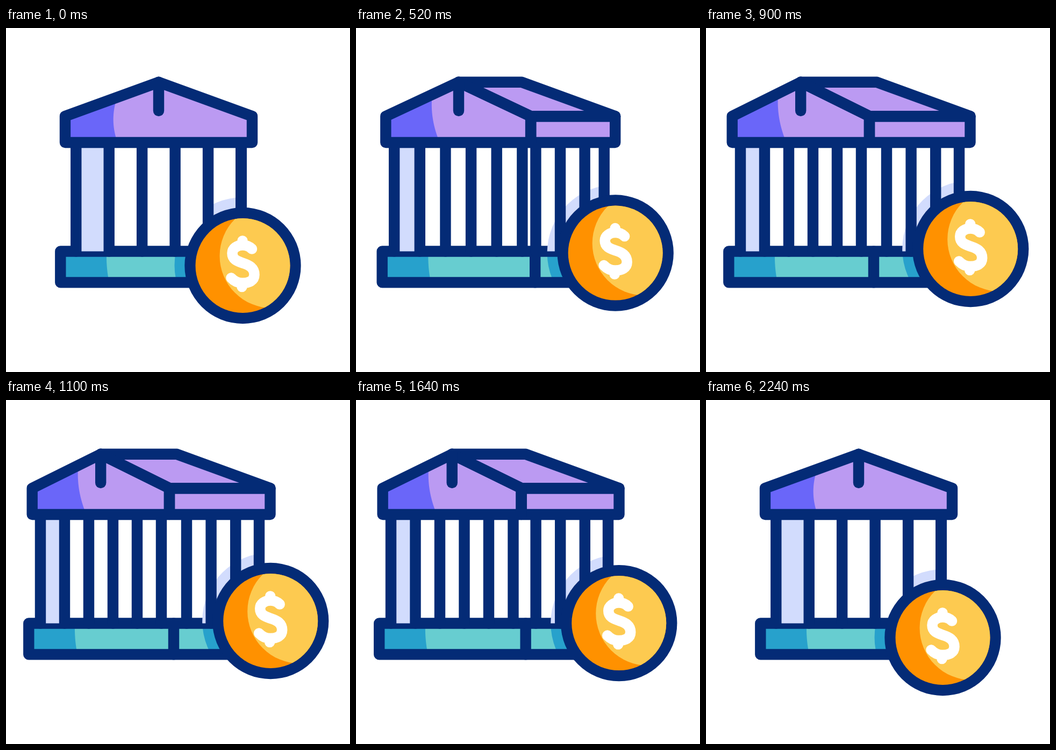
These frames come from a looping animation (640x640 px, 2.4 s). An HTML page with a canvas:

```html
<!DOCTYPE html>
<html lang="en">
<head>
<meta charset="utf-8">
<title>Bank and coin</title>
<style>
html, body { margin: 0; width: 100%; height: 100%; overflow: hidden; background: #fff; }
canvas { display: block; width: 100vmin; height: 100vmin; }
</style>
</head>
<body>
<canvas id="stage" width="640" height="640"></canvas>
<script>
const ctx = document.getElementById('stage').getContext('2d');
const LOOP = 2400, STEP = 20, REST = 2240;
const NAVY = '#042b76', LILAC = '#bb9af2', VIOLET = '#6a66f9', PALE = '#d2dcfd';
const TEAL = '#67cdd0', BLUE = '#27a1cc', ORANGE = '#ff9100', YELLOW = '#fdca50', RED = '#ff6052';
const LINE = 20.4;
const ROOF = 100.8, EAVE = 164.2, BEAM = 213, FLOOR = 415.5, GROUND = 473.4;

const mix = (a, b, k) => a + (b - a) * k;
const clamp = v => Math.min(1, Math.max(0, v));
const smooth = v => { v = clamp(v); return v * v * (3 - 2 * v); };
const span = (t, a, b) => smooth((t - a) / (b - a));
// goes to 1 between 200 and `there`, then back to 0 between `from` and `home`
const trip = (t, there, from, home) => span(t, 200, there) - span(t, from, home);

function trace(points, closed) {
  ctx.beginPath();
  points.forEach(([x, y]) => ctx.lineTo(x, y));
  if (closed) ctx.closePath();
}
function fill(points, color) {
  trace(points, true);
  ctx.fillStyle = color;
  ctx.fill();
}
function line(points, closed, color = NAVY, width = LINE) {
  trace(points, closed);
  ctx.strokeStyle = color;
  ctx.lineWidth = width;
  ctx.stroke();
}
function disc(x, y, r, color) {
  ctx.beginPath();
  ctx.arc(x, y, r, 0, 7);
  ctx.fillStyle = color;
  ctx.fill();
}
function clipped(points, draw) {
  ctx.save();
  trace(points, true);
  ctx.clip();
  draw();
  ctx.restore();
}
const box = (x0, y0, x1, y1) => [[x0, y0], [x1, y0], [x1, y1], [x0, y1]];

// area to the right of a shallow vertical curve
function rightOf(x, y, bend, y0, y1, color) {
  const pts = [[640, y0]];
  for (let v = y0; v <= y1; v += 3) pts.push([x + bend * (v - y) ** 2, v]);
  pts.push([640, y1]);
  fill(pts, color);
}

function pose(t) {
  const turn = trip(t, 617, 1582, 2218);
  const swing = t > 700 && t < 1500 ? 40 * Math.sin((t - 700) * Math.PI / 200) : 0;
  return {
    left: trip(t, 602, 1596, 2204),
    turn,
    side: trip(t, 690, 1548, 2168),
    x: mix(440.5, 492.2, trip(t, 641, 1536, 2250)),
    y: mix(442, 411, trip(t, 672, 1460, 2250)) + swing
  };
}

function drawDots(t) {
  if (t < 1760 || t > 2220) return;
  const k = mix(0.35, 1.75, Math.sin(clamp((t - 1760) / 460) * Math.PI / 2)) - 0.01;
  const r = 10.7 * (1 - span(t, 1960, 2220));
  disc(440 + 37 * k, 170 - 59 * k, r, RED);
  disc(440 + 63 * k, 170 - 28 * k, r, RED);
}

function drawBase(p) {
  const x0 = mix(101.3, 42.3, p.left), x1 = mix(466.6, 500, p.side);
  const area = box(x0, FLOOR, x1, GROUND);
  const corner = mix(466.6, 312, p.turn);
  clipped(area, () => {
    fill(area, BLUE);
    rightOf(mix(187, 128, p.left), 426, 0.0022, FLOOR, GROUND + 3, TEAL);
    disc(p.x, p.y, 127, BLUE);
  });
  line([[corner, FLOOR], [corner, GROUND]]);
  line(area, true);
}

function drawColumns(p) {
  const first = mix(130.3, 64, p.left), last = mix(437.5, 289, p.turn);
  const end = mix(437.5, 471, p.side);
  const front = i => mix(first, last, i / 5);
  fill(box(first, BEAM, front(1), FLOOR), PALE);
  clipped(box(front(4), BEAM, end, FLOOR), () => disc(p.x, p.y, 127, PALE));

  const gap = 47 * clamp((p.side - 0.32) / 0.68) ** 1.2;
  const xs = [end];
  for (let i = 0; i < 6; i++) xs.push(front(i));
  for (let i = 0; i < 3; i++) xs.push(Math.min(end, last + gap + 45.6 * i));
  xs.forEach(x => line([[x, BEAM], [x, FLOOR]]));
}

function drawRoof(p) {
  const x0 = mix(110, 48.7, p.left), top = mix(284, 176.2, p.turn);
  const corner = mix(458, 304, p.turn), back = mix(284, 318, p.side);
  const x1 = mix(458, 491.5, p.side);
  const face = [[x0, BEAM], [x0, EAVE], [top, ROOF], [corner, EAVE], [corner, BEAM]];
  const slope = [[top, ROOF], [back, ROOF], [x1, EAVE], [corner, EAVE]];
  const wall = box(corner, EAVE, x1, BEAM);

  fill(slope, LILAC);
  fill(wall, LILAC);
  clipped(face, () => {
    fill(face, VIOLET);
    rightOf(mix(199.7, 133.7, p.left), mix(170, 138, p.turn),
      mix(0.0042, 0.0028, p.turn), 90, 216, LILAC);
  });
  // the side has no outline while it is folded flat
  if (p.side > 0.001) {
    line(slope, true);
    line(wall, true);
  }
  line(face, true);
  line([[top, ROOF], [top, 154]]);
}

const dollar = new Path2D('M17 -31C11.5 -36.5 5.5 -38 -.5 -38C-10.500 -38 -19.500 -32 -19.500 -23' +
  'C-19.500 -10 -7.500 -7.500 .5 -4.500C11.500 -1 21.500 4 21.500 17C21.500 28 11.500 32.500 -.5 32.500' +
  'C-9.500 32.500 -16 29 -21.500 23M-.5 -46V-38M-1.500 32.500V39.500');

function drawCoin(p) {
  ctx.save();
  ctx.translate(p.x, p.y);
  disc(0, 0, 108.2, NAVY);
  disc(0, 0, 88, ORANGE);
  ctx.save();
  ctx.beginPath();
  ctx.arc(0, 0, 88, 0, 7);
  ctx.clip();
  disc(54, -18, 97, YELLOW);
  ctx.restore();
  ctx.strokeStyle = '#fff';
  ctx.lineWidth = 19.5;
  ctx.stroke(dollar);
  ctx.restore();
}

function draw(now) {
  let t = Math.floor((now % LOOP) / STEP) * STEP;
  if (t >= REST) t = 0;
  const p = pose(t);
  ctx.fillStyle = '#fff';
  ctx.fillRect(0, 0, 640, 640);
  ctx.lineCap = ctx.lineJoin = 'round';
  drawDots(t);
  drawBase(p);
  drawColumns(p);
  drawRoof(p);
  drawCoin(p);
}

let start;
function tick(now) {
  if (start === undefined) start = now;
  draw(now - start);
  requestAnimationFrame(tick);
}
draw(0);
requestAnimationFrame(tick);
</script>
</body>
</html>
```
